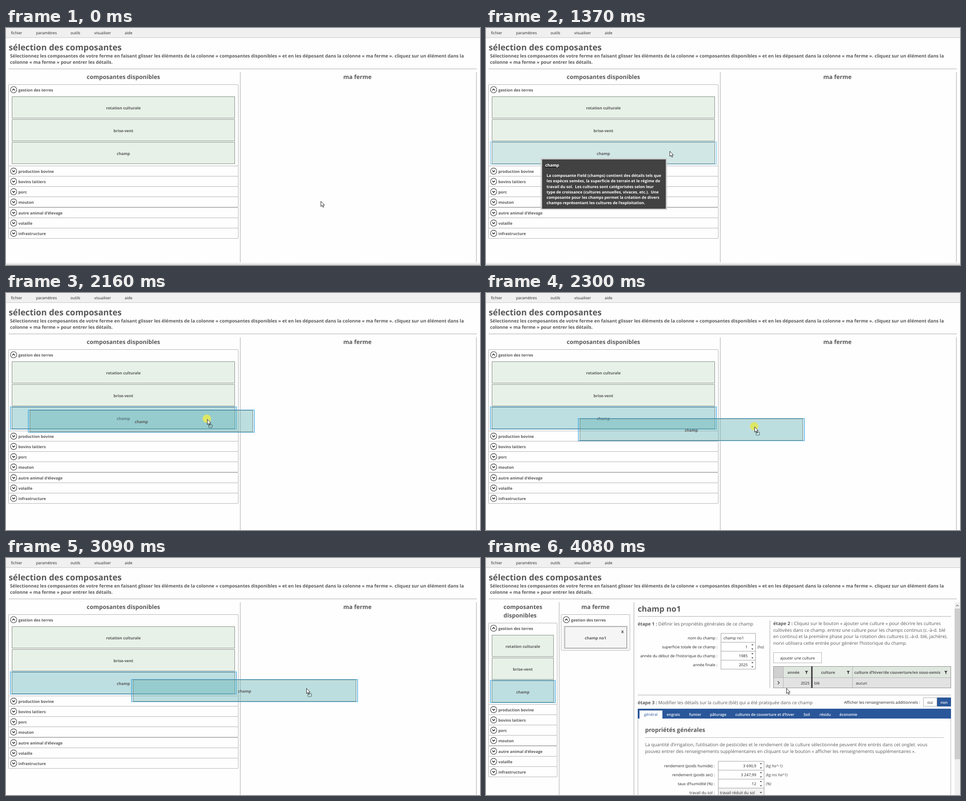
Write an HTML page that moves like this. It is 1056 px wide and 530 px high and loops after 5410 ms.

```html
<!DOCTYPE html>
<html lang="fr">
<head>
<meta charset="utf-8">
<title>Sélection des composantes</title>
<style>
html, body { margin: 0; height: 100%; overflow: hidden; background: #fefefe; }
svg { display: block; width: 1056px; height: 530px; }
text { font: 8.7px "Open Sans", "Noto Sans", sans-serif; fill: #222; white-space: pre; text-rendering: geometricPrecision; }
.b { font-weight: 700; fill: #595959; }
.i { font-style: italic; fill: #444; }
.p { font-size: 10.2px; fill: #5a5a5a; }
.h { font-size: 13px; }
.w { fill: #fff; }
.t { font-size: 8.4px; font-weight: 600; }
.m { text-anchor: middle; }
.e { text-anchor: end; }
.ring { fill: none; }
.card { fill: #e8f1e8; stroke: #7f8a80; }
.hover .ring { fill: #e5f4fb; stroke: #70bfe6; }
.hover .card { fill: #d1e7e6; }
.sel .ring { fill: #cbe8f6; stroke: #2f9fd8; }
.sel .card { fill: #bddfe1; }
.copy .ring { fill: rgba(38,160,218,.2); stroke: #2f9fd8; }
.copy .card { fill: rgba(124,184,152,.25); }
</style>
</head>
<body>
<svg viewBox="0 0 1056 530">
  <defs>
    <linearGradient id="shade" x2="0" y2="1">
      <stop stop-color="#fefefe"/><stop offset="1" stop-color="#d6d6d6"/>
    </linearGradient>
  </defs>
  <g id="top"></g>
  <g id="list"></g>
  <g id="detail"></g>
  <g id="tip"></g>
  <g id="ghost"></g>
  <circle id="click" r="9.3" fill="#dde765"/>
  <g id="cursor">
    <path d="M.5 .5V12.2L3.2 9.7L5.2 14L7 13.2L5.1 9H8.6Z" fill="#fff" stroke="#222" stroke-linejoin="round"/>
    <rect id="drop" x="3.5" y="12" width="8" height="7" rx="1" fill="none" stroke="#222" stroke-dasharray="1.6 .8"/>
  </g>
</svg>
<script>
const $ = id => document.getElementById(id);
const text = (x, y, s, cls = '', size) =>
  `<text x="${x}" y="${y}" class="${cls}"${size ? ` style="font-size:${size}px"` : ''}>${s}</text>`;
const lines = (x, y, gap, cls, rows) => rows.map((s, i) => text(x, y + i * gap, s, cls)).join('');
const rect = (x, y, x2, y2, fill, stroke = 'none', extra = '') =>
  `<rect x="${x}" y="${y}" width="${x2 - x}" height="${y2 - y}" fill="${fill}" stroke="${stroke}" ${extra}/>`;
const path = (d, stroke = '#aaa', width = 1, fill = 'none') =>
  `<path d="${d}" stroke="${stroke}" stroke-width="${width}" fill="${fill}"/>`;
const triangle = (x, y, dir, r = 2.3) =>
  path(`M${x - r} ${y + dir}h${2 * r}l${-r} ${-2.6 * dir}z`, 'none', 0, '#333');
const divider = x => path(`M${x} 99V530`, '#c0c0c0', 1.5);

function expander(x, y, label, open) {
  const d = open ? -1 : 1;
  return `<circle cx="${x}" cy="${y}" r="7" fill="#fff" stroke="#333" stroke-width="1.1"/>` +
    path(`M${x - 3} ${y - 1.5 * d}l3 ${3 * d}l3 ${-3 * d}`, '#222', 1.6) +
    text(x + 10.5, y + 3.8, label, 'b');
}

function card(right, y, label, state = '') {
  return `<g class="${state}">` +
    (state ? `<rect class="ring" x="9.5" y="${y - 1}" width="${right - 6}" height="50"/>` : '') +
    `<rect class="card" x="13.5" y="${y}" width="${right - 14}" height="48"/>` +
    text((13 + right) / 2, y + 28, label, 'b m') + '</g>';
}

const groups = ['production bovine', 'bovins laitiers', 'porc', 'mouton',
  "autre animal d'élevage", 'volaille', 'infrastructure'];

function components(right, dy, champ) {
  const frame = (y, y2) => rect(5.5, y + dy, right + 7.5, y2 + dy, 'none', '#b2b2b2', 'rx="1.5"');
  return frame(126.5, 308.5) + expander(17, 138 + dy, 'gestion des terres', true) +
    card(right, 153.5 + dy, 'rotation culturale') +
    card(right, 204.5 + dy, 'brise-vent') + champ +
    groups.map((s, i) => {
      const y = Math.floor(308.5 + 23.15 * i) + .5;
      return frame(y, y + 23) + expander(17, y + 11.6 + dy, s);
    }).join('');
}

function field(x, x2, y, label, value, unit = '') {
  const numeric = /^\d/.test(value), combo = value.startsWith('travail');
  return text(x - 7.5, y + 3.2, label + ' :', 'e') +
    rect(x + .5, y - 10, x2 + .5, y + 10, combo ? '#f2f2f2' : '#fff', '#a0a0a0') +
    (numeric
      ? text(x2 - 17, y + 3.2, value, 'e') + triangle(x2 - 6.5, y - 4.5, 1) + triangle(x2 - 6.5, y + 5, -1)
      : text(x + (combo ? 4 : 6), y + 3.2, value)) +
    (combo ? triangle(x2 - 6.5, y, -1, 2.8) : '') +
    text(x2 + 4.5, y + 3, unit, 'i');
}

const step = n => `<tspan class="b">étape ${n} :</tspan> `;
const funnel = x => path(`M${x - 3.5} 252.5h7l-2.6 3v4l-1.8 -1v-3z`, 'none', 0, '#333');

$('top').innerHTML =
  rect(0, 0, 1056, 21, '#f0f0f0') + path('M0 21.5H1056', '#c6c6c6') +
  [[11, 'fichier'], [67, 'paramètres'], [143.5, 'outils'], [196.5, 'visualiser'], [264.5, 'aide']]
    .map(([x, s]) => text(x, 13.8, s, '', 8.6)).join('') +
  text(6, 49.5, 'sélection des composantes', 'b', 18.8) +
  lines(9, 66.4, 14, 'p b', [
    'Sélectionnez les composantes de votre ferme en faisant glisser les éléments de la colonne « composantes disponibles » et en les déposant dans la colonne « ma ferme ». cliquez sur un élément dans la',
    'colonne « ma ferme » pour entrer les détails.']) +
  path('M6 91.5H1049');

$('list').innerHTML =
  text(261.5, 114, 'composantes disponibles', 'h b m') + text(783, 114, 'ma ferme', 'h b m') +
  divider(522) + divider(1048) +
  components(510, 0, `<g id="champ">${card(510, 255.5, 'champ', 'plain')}</g>`) +
  `<rect id="shadow" y="524" width="1056" height="6" fill="url(#shade)"/>`;

$('ghost').innerHTML = card(510, 255.5, 'champ', 'copy');

$('tip').innerHTML =
  rect(121, 291, 404, 407, '#d2d2d2', 'none', 'opacity=".55"') +
  rect(123, 292, 402, 405.5, '#c4c4c4') + rect(125, 294, 400.5, 404, '#424242') +
  `<g text-decoration="underline">${text(132, 310, 'champ', 'b w', 9.1)}</g>` +
  lines(135, 333, 12.25, 'b w', [
    'La composante Field (champs) contient des détails tels que',
    'les espèces semées, la superficie de terrain et le régime de',
    'travail du sol.  Les cultures sont catégorisées selon leur',
    'type de croissance (cultures annuelles, vivaces, etc.).  Une',
    'composante pour les champs permet la création de divers',
    'champs représentant les cultures de l’exploitation.']);

$('detail').innerHTML =
  lines(39, 114, 18.6, 'h b', ['composantes', 'disponibles']) +
  components(151, 19, card(151, 274.5, 'champ', 'sel')) +
  divider(163) + divider(329.5) +
  text(244, 114, 'ma ferme', 'h b m') +
  rect(167.5, 126.5, 320.5, 206.5, 'none', '#b2b2b2', 'rx="1.5"') +
  expander(179, 138, 'gestion des terres', true) +
  rect(171.5, 151.5, 316.5, 203.5, '#f4f4f4', '#e2e2e2') +
  rect(175.5, 153.5, 313.5, 201.5, '#f5f5f5', '#777') +
  text(244, 181.5, 'champ no1', 'b m') + text(304, 167.5, 'x', 'b m', 10.5) +

  text(338, 120, 'champ no1', 'b', 17.5) +
  path('M338 130.5H1036M338 306.5H1036M632.5 139V291') +
  text(338, 150.6, step(1) + 'Définir les propriétés générales de ce champ', 'p') +
  field(523, 600, 178.5, 'nom du champ', 'champ no1') +
  field(523, 600, 198.5, 'superficie totale de ce champ', '1', '(ha)') +
  field(523, 600, 218.5, "année du début de l'historique du champ", '1985') +
  field(523, 600, 238.5, 'année finale', '2025') +
  lines(640, 150.4, 14.4, 'p', [
    step(2) + 'Cliquez sur le bouton « ajouter une culture » pour décrire les cultures',
    'cultivées dans ce champ. entrez une culture pour les champs continus (c.-à-d. blé',
    'en continu) et la première phase pour la rotation des cultures (c.-à-d. blé, jachère).',
    'norvi utilisera cette entrée pour générer l’historique du champ.']) +
  rect(640.5, 211.5, 747.5, 234.5, '#fff', '#b0b0b0') + text(694, 226.5, 'ajouter une culture', 'm') +

  rect(640, 242, 1036, 267, '#dfe7df') + rect(640, 242, 662, 267, '#d0d0d0') +
  rect(640, 267, 1036, 290, '#e2e2e2') +
  path('M662.5 242V290M816.5 242V290M640 267.5H1036', '#b4b4b4') +
  rect(640.5, 242.5, 1035.5, 290.5, 'none', '#8c8c8c') + path('M726 242V290.5', '#333', 3) +
  text(685, 259, 'année', 'b m') + text(762, 259, 'culture', 'b m') +
  text(820.5, 259, 'culture d’hiver/de couverture/en sous-semis', 'b') +
  funnel(714) + funnel(807) + funnel(1024.5) +
  path('M650 275.5l3.5 3.5l-3.5 3.5', '#333', 1.2) +
  text(721, 282.5, '2025', 'e') + text(731, 282.5, 'blé') + text(824, 282.5, 'aucun') +

  text(338, 326.6, step(3) + 'Modifier les détails sur la culture (blé) qui a été pratiquée dans ce champ', 'p') +
  text(967, 326, 'Afficher les renseignements additionnels :', 'e') +
  rect(974.5, 312.5, 1004.5, 331.5, '#fff', '#b0b0b0') + rect(1005, 312, 1036, 332, '#2a579a') +
  text(989.5, 325.5, 'oui', 'm') + text(1020.5, 325.5, 'non', 'w t m') +
  rect(338, 337, 1036, 359, '#2a579a') + rect(342, 341, 393, 359.5, '#fefefe') +
  text(352, 353.3, '<tspan fill="#2a579a">général</tspan>') +
  [[402.5, 'engrais'], [452.5, 'fumier'], [499, 'pâturage'], [555.5, 'cultures de couverture et d’hiver'],
    [707.5, 'Soil'], [743, 'résidu'], [787.5, 'économie']]
    .map(([x, s]) => text(x, 353.3, s, 'w t')).join('') +
  path('M338.5 359V530M1035.5 359V530', '#b4b4b4') +
  text(354.5, 389.3, 'propriétés générales', 'h b') + path('M354 401.5H1020', '#b4b4b4') +
  lines(354.5, 421.2, 14.3, 'p', [
    'La quantité d’irrigation, l’utilisation de pesticides et le rendement de la culture sélectionnée peuvent être entrés dans cet onglet. vous',
    'pouvez entrer des renseignements supplémentaires en cliquant sur le bouton « afficher les renseignements supplémentaires ».']) +
  field(517, 619, 464.5, 'rendement (poids humide)', '3 690,9', '(kg ha^-1)') +
  field(517, 619, 484.5, 'rendement (poids sec)', '3 247,99', '(kg ms ha^1)') +
  field(517, 619, 504.5, 'taux d’humidité (%)', '12', '(%)') +
  field(517, 619, 524.5, 'travail du sol', 'travail réduit du sol') +
  rect(1044, 99, 1056, 530, '#f0f0f0') + rect(1044, 113, 1056, 450, '#cdcdcd') +
  path('M1047 108l3 -3l3 3', '#777', 1.2);

const LOOP = 5410;
const dragX = [0, 40, 95, 148, 196, 232, 255, 266, 270];
const dragY = [0, 7, 14, 21, 26, 26, 23, 19, 17];
const clamp = (v, max) => Math.max(0, Math.min(max, v));
const ease = (u, a, b) => 1 - (1 - u ** a) ** b;
const show = (id, on) => $(id).style.display = on ? '' : 'none';
const move = (id, x, y) => $(id).setAttribute('transform', `translate(${x} ${y})`);

function draw() {
  const t = performance.now() % LOOP;

  // approach, then drag, both moving in 15 steps per second
  const u = clamp(Math.floor((t - 190) / 65.88) + 1, 18) / 18;
  const k = clamp(Math.floor((t - 2030) / 66.25), 8);
  const dx = dragX[k], dy = dragY[k];
  const x = Math.round(701 - 292 * ease(u, 2, 2.9) + dx * .964);
  const y = Math.round(388 - 112 * ease(u, 3, 4.3) + dy * .92 - .6);

  const picked = t >= 1510;
  $('champ').firstChild.setAttribute('class', picked ? 'sel' : y < 304 ? 'hover' : 'plain');
  show('list', t < 4080);
  show('detail', t >= 4080);
  show('shadow', !picked);
  show('tip', t >= 1370 && k < 1);
  show('ghost', k > 0 && t < 3490);
  show('drop', k > 0 && t < 3620);
  show('click', picked && t < 3090);
  move('ghost', dx, dy);
  move('click', x - .6, y - 1);
  move('cursor', x, y);
  requestAnimationFrame(draw);
}
draw();
</script>
</body>
</html>
```
